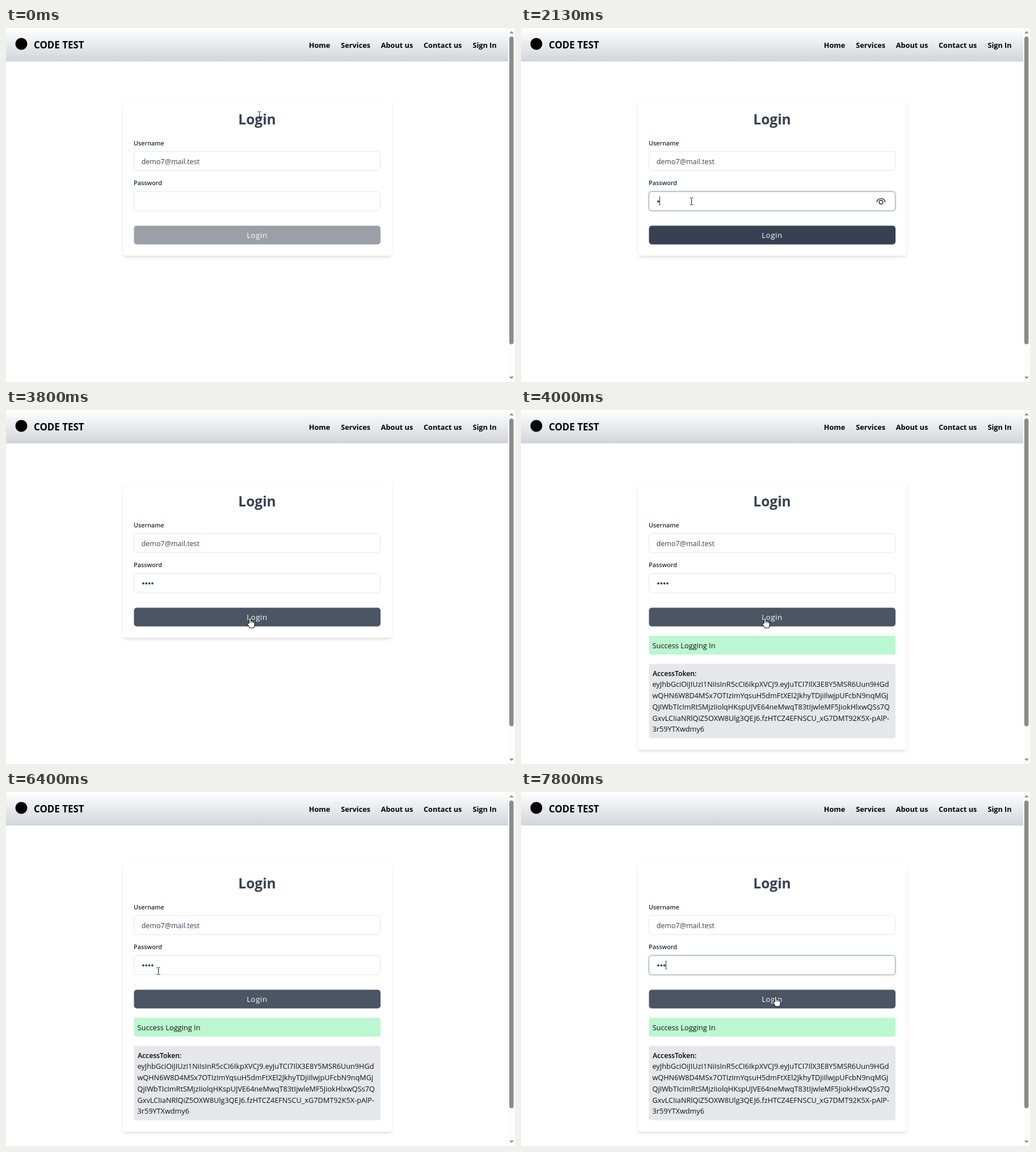
Recreate the animation shown at these times as an HTML page with a canvas. Size 897 by 624 pixels, loop 8 s.

```html
<!DOCTYPE html>
<html lang="en">
<head>
<meta charset="utf-8">
<title>Login form</title>
<style>
  html, body { margin: 0; width: 100%; height: 100%; overflow: hidden; background: #fff; }
  canvas { display: block; }
</style>
</head>
<body>
<canvas id="stage" width="897" height="624"></canvas>
<script>
const ctx = document.getElementById('stage').getContext('2d');
const LOOP = 8000, STEP = 1000 / 15;
const FACE = '"Open Sans", "Noto Sans", sans-serif';

const NAV = [['Home', 552.5], ['Services', 616.2], ['About us', 689], ['Contact us', 769.7], ['Sign In', 843.5]];
const TOKEN = [
  'eyJhbGciOiJIUzI1NiIsInR5cCI6IkpXVCJ9.eyJuTCI7IlX3E8Y5MSR6Uun9HGd',
  'wQHN6W8D4MSx7OTIzImYqsuH5dmFtXEl2JkhyTDjiIlwjpUFcbN9nqMGj',
  'QjIWbTIcImRtSMjzIiolqHKspUJVE64neMwqT83tIjwleMF5JiokHlxwQSs7Q',
  'GxvLCIiaNRlQiZ5OXW8Ulg3QEJ6.fzHTCZ4EFNSCU_xG7DMT92K5X-pAlP-',
  '3r59YTXwdmy6'
];

// Moments of the story, in ms
const FOCUS = 860, KEYS = [2130, 2390, 2725, 2995], SUBMIT = 3730, REPLY = 3995;
const REFOCUS = 6660, ERASE = 7395;
const CARET_RESETS = [FOCUS, ...KEYS, REFOCUS, ERASE];

// Pointer path: time, x, y
const PATH = [
  [0, 446, 153], [200, 405, 196], [400, 335, 268], [600, 300, 305],
  [3067, 300, 305], [3200, 421, 321], [3400, 421, 321], [3667, 430, 366],
  [4133, 430, 366], [4533, 487, 297], [4600, 487, 297], [4733, 468, 280],
  [5067, 380, 541], [5267, 294, 480], [5333, 305, 452], [5467, 350, 410],
  [5667, 401, 389], [5933, 401, 389], [6400, 268, 315],
  [7333, 268, 315], [7733, 449, 360]
];

const ARROW = new Path2D('M0 0V16L3.7 12.5L6.2 18.2L8.6 17.2L6.2 11.6H11.3Z');
const HAND = new Path2D('M-1.5 10V1.2Q-1.5 -.2 0 -.2Q1.4 -.2 1.4 1.2V6Q3.4 5.3 4 6.7Q6 6 6.4 7.5Q8.2 7.2 8.2 9V13L6.8 18H-.6L-4.2 11.8Q-4.6 9.8 -3 9.8Z');
const KNUCKLES = new Path2D('M1.4 6V9.5M4 6.7V9.8M6.4 7.5V10');
const BEAM = new Path2D('M-2.5 -5.5H-.5L.5 -4.5L1.5 -5.5H3.5M.5 -4.5V5.5M-2.5 6.5H-.5L.5 5.5L1.5 6.5H3.5');
const BROW = new Path2D('M627 306.8C629 298.6 640 298.6 642 306.8');

const clamp = v => Math.max(0, Math.min(1, v));
const inside = (x, y, l, t, r, b) => x >= l && x <= r && y >= t && y <= b;

function box(x, y, w, h, r, fill, line) {
  ctx.beginPath();
  ctx.roundRect(x, y, w, h, r);
  if (fill) { ctx.fillStyle = fill; ctx.fill(); }
  if (line) { ctx.strokeStyle = line; ctx.lineWidth = 1; ctx.stroke(); }
}

function text(s, x, y, size, color, weight = 400, align = 'left') {
  ctx.font = `${weight} ${size}px ${FACE}`;
  ctx.textAlign = align;
  ctx.fillStyle = color;
  ctx.fillText(s, x, y);
}

function shape(path, fill, line, width = 1) {
  if (fill) { ctx.fillStyle = fill; ctx.fill(path); }
  ctx.strokeStyle = line;
  ctx.lineWidth = width;
  ctx.stroke(path);
}

function triangle(x, y, dy) {
  ctx.beginPath();
  ctx.moveTo(x - 4, y + dy);
  ctx.lineTo(x, y - dy);
  ctx.lineTo(x + 4, y + dy);
  ctx.fill();
}

function page() {
  ctx.fillStyle = '#fff';
  ctx.fillRect(0, 0, 897, 624);
  const g = ctx.createLinearGradient(0, 0, 0, 59);
  g.addColorStop(0, '#fff');
  g.addColorStop(1, '#d1d5db');
  ctx.fillStyle = g;
  ctx.fillRect(0, 0, 885, 59);
  box(16.5, 17.5, 21, 21, 10.5, '#000');
  text('CODE TEST', 49, 36, 16.9, '#000', 700);
  for (const [label, x] of NAV) text(label, x, 35, 12.7, '#000', 700, 'center');

  ctx.fillStyle = '#fcfcfc';
  ctx.fillRect(885, 0, 12, 624);
  box(887, 15, 7.5, 542.5, 3.75, '#8b8b8b');
  triangle(891, 7.5, 2);
  triangle(891, 616.5, -2);
}

function card(bottom) {
  ctx.save();
  ctx.shadowColor = 'rgba(0,0,0,.1)';
  ctx.shadowBlur = 5;
  ctx.shadowOffsetY = 3.3;
  box(206.8, 126.8, 472.4, bottom - 127.6, 5, '#fff');
  ctx.shadowBlur = 3.3;
  ctx.shadowOffsetY = 1.6;
  box(207.6, 127.6, 470.8, bottom - 129.2, 5, '#fff');
  ctx.restore();
  box(206, 126, 474, bottom - 126, 5, '#fff');
}

function eye() {
  shape(BROW, null, '#111', 1.3);
  ctx.beginPath();
  ctx.arc(634.5, 307, 3.3, 0, 7);
  ctx.stroke();
}

function password(t) {
  const focused = (t >= FOCUS && t < SUBMIT) || t >= REFOCUS;
  if (focused) box(223, 285.5, 439, 39, 7, 'rgba(209,213,219,.45)');
  box(225.5, 288.5, 434, 33.5, 5, '#fff', focused ? '#9ca3af' : '#e5e7eb');

  const dots = KEYS.filter(k => t >= k).length - (t >= ERASE);
  for (let i = 0; i < dots; i++) {
    ctx.beginPath();
    ctx.arc(242 + i * 5.3, 305.7, 1.9, 0, 7);
    ctx.fillStyle = '#374151';
    ctx.fill();
  }
  if (!focused) return;
  if (t >= KEYS[0] && t < SUBMIT) eye();
  const reset = CARET_RESETS.filter(r => r <= t).pop();
  if (Math.floor((t - reset) / 530) % 2 === 0) {
    ctx.fillStyle = '#1f2937';
    ctx.fillRect(Math.round(239 + dots * 5.4), 297, 1, 16);
  }
}

function button(t) {
  let fill = '#9ba0a8';
  if (t >= KEYS[0]) {
    // Colour fades to the hover tone and back over 200 ms
    const fade = at => clamp((t - at) / 200);
    const k = fade(3533) - fade(6600) + fade(7590);
    fill = `rgb(${55 + 20 * k},${65 + 20 * k},${81 + 18 * k})`;
  }
  box(225.5, 348.5, 434.5, 33, 5, fill);
  ctx.letterSpacing = '0.5px';
  text('Login', 442.4, 370, 13.4, '#fff', 400, 'center');
  ctx.letterSpacing = '0px';
}

function reply() {
  box(225.5, 398, 434.5, 33, 3.3, '#bbf7d0');
  text('Success Logging In', 231.5, 419.5, 12.8, '#111');
  box(225.5, 447.5, 434.5, 131, 3.3, '#e5e7eb');
  text('AccessToken:', 232, 468.7, 12.2, '#000', 600);
  TOKEN.forEach((line, i) => text(line, 231.5, 488.3 + i * 19.75, 12.7, '#111'));
}

function pointerAt(t) {
  let i = 0;
  while (i < PATH.length - 1 && PATH[i + 1][0] <= t) i++;
  const a = PATH[i], b = PATH[i + 1] || a;
  const k = clamp((t - a[0]) / (b[0] - a[0] || 1));
  return [Math.round(a[1] + (b[1] - a[1]) * k), Math.round(a[2] + (b[2] - a[2]) * k)];
}

function pointer(t) {
  const [x, y] = pointerAt(t), shown = t >= REPLY;
  const overButton = t >= KEYS[0] && inside(x, y, 225, 348, 660, 382);
  const overText = inside(x, y, 408, 146, 476, 177) ||
    inside(x, y, 225, 217, 660, 252) || inside(x, y, 225, 288, 660, 322) ||
    shown && (inside(x, y, 231, 405, 342, 424) || inside(x, y, 231, 451, 312, 473) ||
      inside(x, y, 231, 474, 650, 573));
  ctx.save();
  ctx.translate(x, y);
  if (overButton) {
    shape(HAND, '#fff', '#000');
    shape(KNUCKLES, null, '#000', 0.8);
  } else if (overText) {
    shape(BEAM, null, '#111');
  } else {
    shape(ARROW, '#fff', '#000');
  }
  ctx.restore();
}

function draw(t) {
  page();
  card(t >= REPLY ? 599 : 401.5);
  text('Login', 442.5, 169.6, 24.5, '#374151', 700, 'center');
  text('Username', 225, 206.5, 10.8, '#1f2937', 600);
  box(225.5, 217.5, 434, 34, 5, '#fff', '#e5e7eb');
  text('demo7@mail.test', 238.7, 239.5, 12.5, '#374151');
  text('Password', 225, 277, 10.8, '#1f2937', 600);
  password(t);
  button(t);
  if (t >= REPLY) reply();
  pointer(t);
}

const start = performance.now();
function tick() {
  const t = (performance.now() - start) % LOOP;
  // Screen updates at 15 per second; the offset absorbs timer rounding
  draw(Math.floor(t / STEP + 0.12) * STEP + 1);
  requestAnimationFrame(tick);
}
tick();
</script>
</body>
</html>
```
